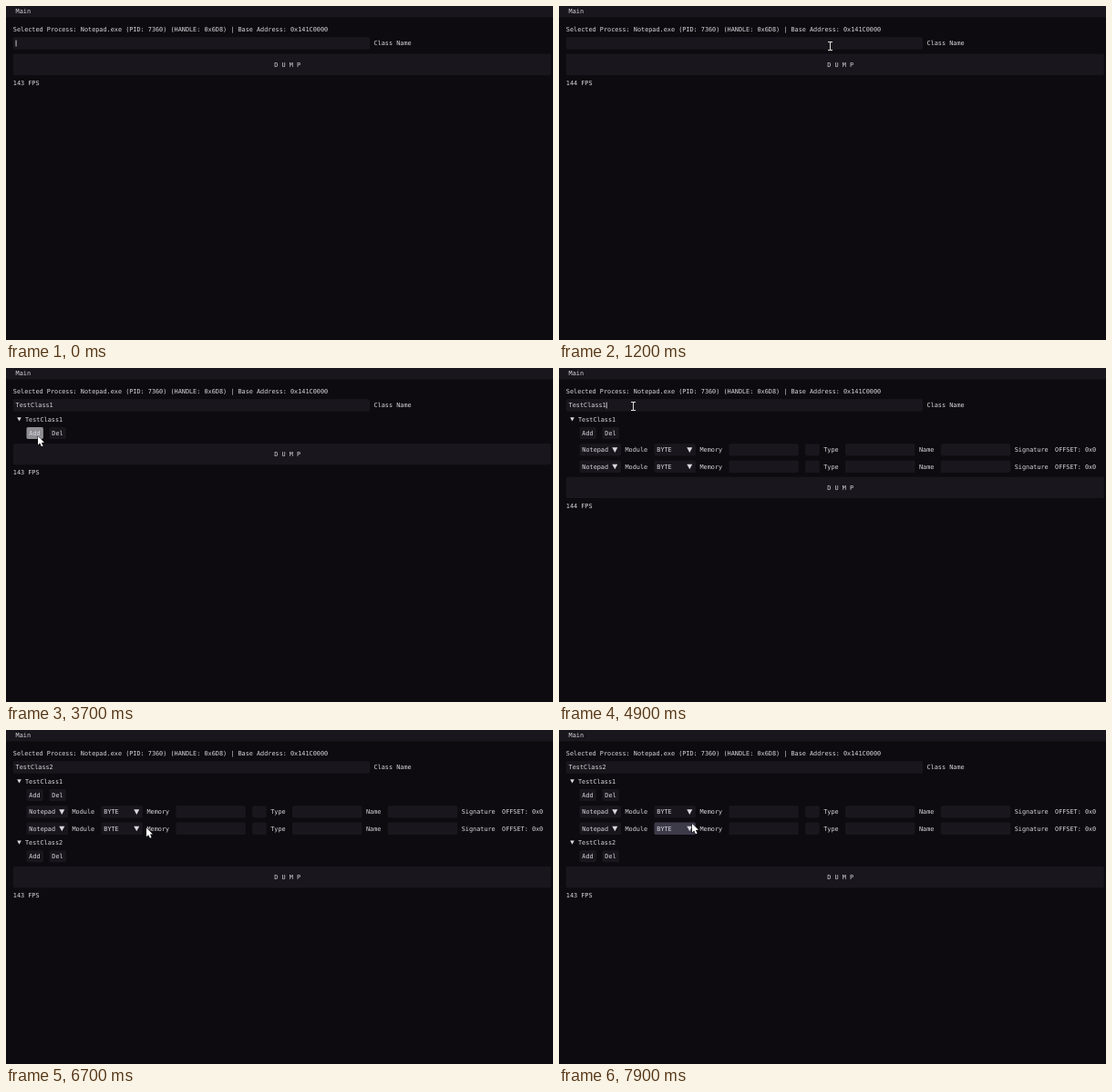
These frames come from a looping animation (600x367 px, 8 s). An HTML page with a canvas:

```html
<!DOCTYPE html>
<html lang="en">
<head>
<meta charset="utf-8">
<title>Class dumper</title>
<style>
html, body { margin: 0; width: 100%; height: 100%; overflow: hidden; background: #0d0b10; }
canvas { display: block; width: 600px; height: 367px; }
</style>
</head>
<body>
<canvas id="stage"></canvas>
<script>
const W = 600, H = 367, LOOP = 8000, STEP = 100;
const COL = {
  bg: '#0d0b10', frame: '#19171d', hover: '#3d3b4a', active: '#8f8f94', text: '#d8d8de'
};
const LEFT = 7.8, INDENT = 22.5, PAD = 2.8, GAP = 4.5, LABEL_GAP = 7.3;
const FIELD_H = 13.4, ROW_H = 18.4, CLASS_H = 30.4;
const FIELD_W = 76.5, COMBO_W = 45.5, INPUT_W = 391.2, INPUT_MID = 41;

// Pointer moves: begin, end, x, y
const ENTER = { x: 318, y: 118 };
const MOVES = [
  [800, 1200, 297.5, 44],
  [1200, 1500, 292.5, 44],
  [3000, 3500, 35, 75],
  [4400, 4900, 81.5, 42],
  [5500, 6000, 45, 57],
  [6000, 6700, 154, 107.6],
  [6800, 7100, 56, 73],
  [7200, 7500, 36, 74],
  [7600, 7800, 51, 82],
  [7800, 7900, 146, 103]
];

// Button presses and the rows each one adds
const CLICKS = [{ t: 3700, rows: 1 }, { t: 4000, rows: 1 }, { t: 7200, rows: -1 }, { t: 7600, rows: 1 }];
const FPS_FLIPS = [200, 2800, 4300, 5300];
const TYPE_START = 1900, FIRST_ENTER = 2900, REFOCUS = 4900, EDIT = 5200, SECOND_ENTER = 5500;

const canvas = document.getElementById('stage');
const ratio = window.devicePixelRatio || 1;
canvas.width = W * ratio;
canvas.height = H * ratio;
const ctx = canvas.getContext('2d');

let mouse = null, pressed = false;

const ease = k => k * k * (3 - 2 * k);

function pointerAt(t) {
  if (t < MOVES[0][0]) return null;
  let { x, y } = ENTER;
  for (const [begin, end, toX, toY] of MOVES) {
    const k = ease(Math.min(1, Math.max(0, (t - begin) / (end - begin))));
    x += (toX - x) * k;
    y += (toY - y) * k;
  }
  return { x, y };
}

const rowsAt = t => CLICKS.reduce((n, c) => t > c.t ? n + c.rows : n, 0);
const fpsAt = t => 143 + FPS_FLIPS.filter(f => t >= f).length % 2;

function inputText(t) {
  if (t < TYPE_START) return '';
  if (t < EDIT) return 'TestClass1'.slice(0, 1 + Math.ceil((t - TYPE_START) / 90));
  return t < EDIT + 200 ? 'TestClass' : 'TestClass2';
}

function caretOn(t) {
  const focused = t < FIRST_ENTER || (t >= REFOCUS && t < SECOND_ENTER);
  const blink = t % 1000;
  return focused && (t >= TYPE_START || blink < 200 || blink >= 400);
}

const over = (x, y, w, h) =>
  mouse && mouse.x >= x && mouse.x <= x + w && mouse.y >= y && mouse.y <= y + h;

function text(s, x, mid) {
  ctx.fillStyle = COL.text;
  ctx.fillText(s, x, mid + 2.4);
  return ctx.measureText(s).width;
}

function box(x, mid, w, h, color) {
  ctx.fillStyle = color;
  ctx.beginPath();
  ctx.roundRect(x, mid - h / 2, w, h, 1.8);
  ctx.fill();
}

const field = (x, mid, w) => box(x, mid, w, FIELD_H, COL.frame);

function button(label, x, mid, w, h, pad = PAD) {
  const hot = over(x, mid - h / 2, w, h);
  box(x, mid, w, h, hot ? (pressed ? COL.active : COL.hover) : COL.frame);
  text(label, x + pad, mid);
}

function downArrow(x, mid, r) {
  ctx.fillStyle = COL.text;
  ctx.beginPath();
  ctx.moveTo(x - r, mid - r * 0.85);
  ctx.lineTo(x + r, mid - r * 0.85);
  ctx.lineTo(x, mid + r);
  ctx.fill();
}

function combo(value, x, mid) {
  button(value, x, mid, COMBO_W, FIELD_H);
  downArrow(x + 38.8, mid, 3);
}

function row(mid) {
  let x = INDENT;
  const label = s => { x += text(s, x + GAP, mid) + GAP + LABEL_GAP; };
  const pick = (value, s) => { combo(value, x, mid); x += COMBO_W; label(s); };
  const entry = (w, s) => { field(x, mid, w); x += w; label(s); };
  pick('Notepad', 'Module');
  pick('BYTE', 'Memory');
  field(x, mid, FIELD_W);
  x += FIELD_W + LABEL_GAP;
  entry(15.5, 'Type');
  entry(FIELD_W, 'Name');
  entry(FIELD_W, 'Signature');
  text('OFFSET: 0x0', x, mid);
}

// Draws one class block and returns its height
function classBlock(name, mid, rows) {
  downArrow(14.5, mid, 2.3);
  text(name, 21, mid);
  button('Add', INDENT, mid + 15.3, 18.4, 13);
  button('Del', INDENT + 25, mid + 15.3, 18.4, 13);
  for (let i = 0; i < rows; i++) row(mid + 33.7 + i * ROW_H);
  return CLASS_H + rows * ROW_H;
}

function iBeam(x, y) {
  ctx.strokeStyle = '#ddd';
  ctx.lineWidth = 1;
  ctx.beginPath();
  for (const end of [-4.5, 4.5]) {
    ctx.moveTo(x - 2.5, y + end);
    ctx.lineTo(x + 2.5, y + end);
    ctx.moveTo(x, y);
    ctx.lineTo(x, y + end);
  }
  ctx.stroke();
}

function arrow(x, y) {
  const shape = [[0, 0], [0, 9.6], [2.2, 7.6], [3.9, 11.2], [5.6, 10.4], [4, 7], [7, 6.8]];
  ctx.beginPath();
  shape.forEach(([dx, dy]) => ctx.lineTo(x + dx, y + dy));
  ctx.closePath();
  ctx.lineWidth = 1;
  ctx.strokeStyle = '#000';
  ctx.stroke();
  ctx.fillStyle = '#fff';
  ctx.fill();
}

function draw(t) {
  mouse = pointerAt(t);
  pressed = CLICKS.some(c => c.t === t);
  ctx.setTransform(ratio, 0, 0, ratio, 0, 0);
  ctx.font = '6.83px "DejaVu Sans Mono", monospace';
  ctx.textRendering = 'geometricPrecision';
  ctx.fillStyle = COL.bg;
  ctx.fillRect(0, 0, W, H);

  ctx.fillStyle = COL.frame;
  ctx.fillRect(0, 0, W, 12.3);
  text('Main', 10.6, 6);
  text('Selected Process: Notepad.exe (PID: 7360) (HANDLE: 0x6D8) | Base Address: 0x141C0000', LEFT, 25.5);

  field(LEFT, INPUT_MID, INPUT_W);
  const typed = text(inputText(t), LEFT + PAD, INPUT_MID);
  text('Class Name', LEFT + INPUT_W + GAP, INPUT_MID);
  if (caretOn(t)) ctx.fillRect(LEFT + PAD + typed, INPUT_MID - 3.4, 0.9, 6.8);

  let y = 56.2;
  if (t >= FIRST_ENTER) y += classBlock('TestClass1', y, rowsAt(t));
  if (t >= SECOND_ENTER) y += classBlock('TestClass2', y, 0);
  button('D U M P', LEFT, y + 8, 590, 23.4, 286.5);
  text(fpsAt(t) + ' FPS', LEFT, y + 28);

  if (!mouse) return;
  const cursor = over(LEFT, INPUT_MID - FIELD_H / 2, INPUT_W, FIELD_H) ? iBeam : arrow;
  cursor(mouse.x, mouse.y);
}

const start = performance.now();
function tick() {
  const t = (performance.now() - start) % LOOP;
  draw(Math.floor(t / STEP) * STEP);
  requestAnimationFrame(tick);
}
tick();
</script>
</body>
</html>
```
